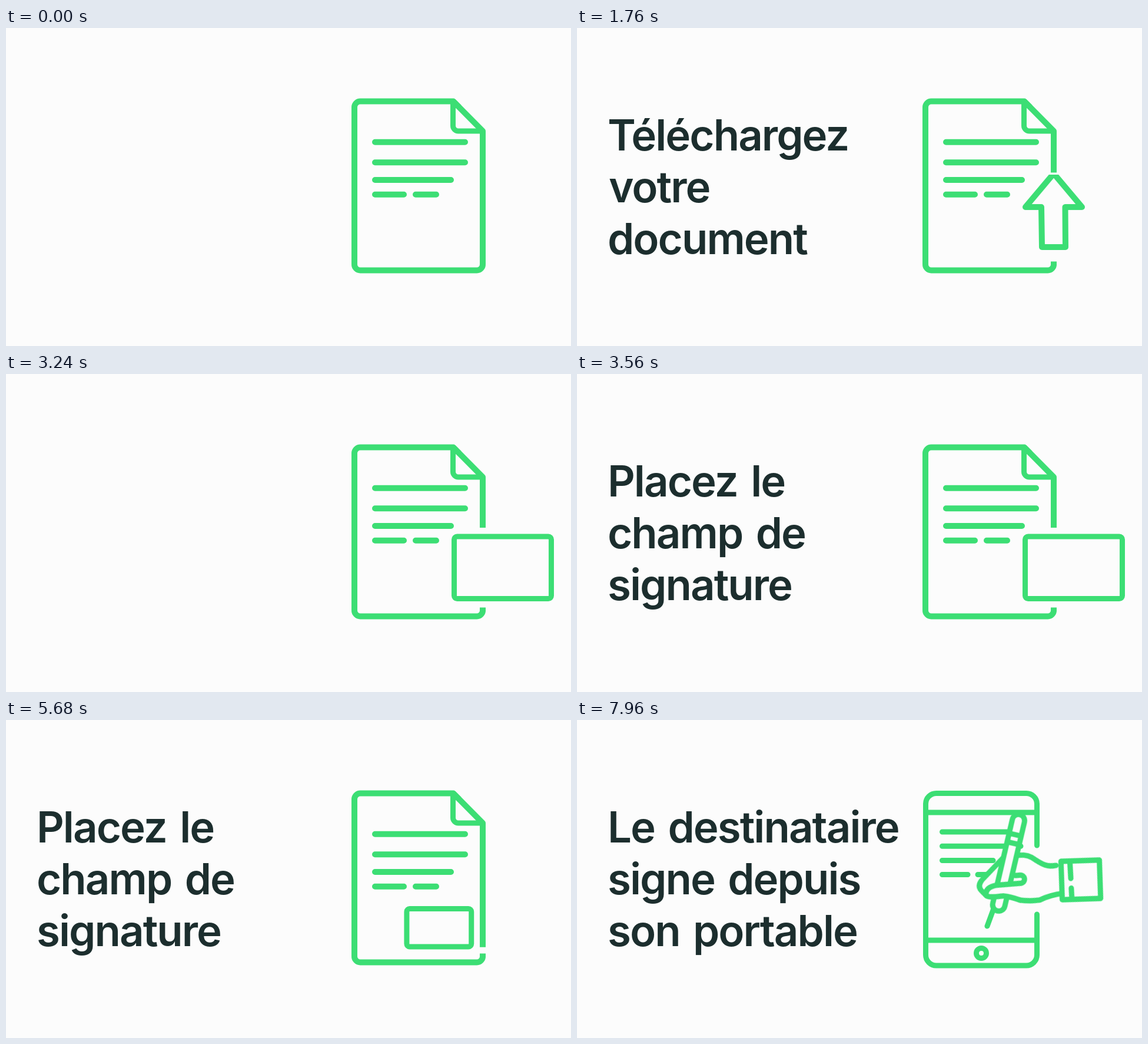
Recreate the animation shown at these times as an HTML page. Size 960x540 px, loop 8 s.

```html
<!DOCTYPE html>
<html lang="fr">
<head>
<meta charset="utf-8">
<title>Signer un document</title>
<style>
  html, body { margin: 0; width: 100%; height: 100%; overflow: hidden; background: #fcfcfc; }
  svg { display: block; width: 960px; height: 540px; }
  text { font: 600 72.5px Inter, sans-serif; letter-spacing: -1.9px; word-spacing: 6px; fill: #1c2e2e; }
  .line { fill: none; stroke: #3cde74; stroke-width: 10; stroke-linejoin: round; }
  .thin { stroke-width: 9; }
  .round { stroke-linecap: round; }
  .solid { fill: #fcfcfc; }
  #edge { stroke-dasharray: 400; }
  #ink { stroke-dasharray: 40; }
  #hand { transform-origin: 735px 270px; }
</style>
</head>
<body>
<svg viewBox="0 0 960 540">
  <clipPath id="window"><rect x="750" y="249" width="120" height="148"/></clipPath>

  <g id="title1">
    <text x="52" y="208">Téléchargez</text>
    <text x="54" y="296">votre</text>
    <text x="52" y="384">document</text>
  </g>
  <g id="title2">
    <text x="52" y="208">Placez le</text>
    <text x="52" y="296">champ de</text>
    <text x="52" y="384">signature</text>
  </g>
  <g id="title3">
    <text x="52" y="208">Le destinataire</text>
    <text x="52" y="296">signe depuis</text>
    <text x="52" y="384">son portable</text>
  </g>

  <g id="page" class="line">
    <path d="M810 396.500V401a10 10 0 0 1-10 10.500H602a10 10 0 0 1-10-10.500V134.500a10 10 0 0 1 10-10H760L770 134.600"/>
    <path id="edge" d="M760 124.500L810 175V397"/>
    <path class="thin" d="M759.500 125V166a9 9 0 0 0 9 9H809"/>
    <path class="round" d="M627 193.700H780M627 228.300H780M627 258H756M627 282.700H676M696 282.700H731"/>
    <g clip-path="url(#window)">
      <path id="arrow" d="M810 256L762 313H789L790 381H830L829.500 313H858Z"/>
    </g>
    <rect id="field" class="thin" rx="5"/>
  </g>

  <g id="phone" class="line thin round">
    <path d="M781.500 213V142a18 18 0 0 0-18-17.500H610.500a18 18 0 0 0-18 17.500V399a18 18 0 0 0 18 18H763.500a18 18 0 0 0 18-18V330"/>
    <path d="M593 157H781M593 374H781"/>
    <circle cx="687" cy="396" r="8.500"/>
    <path d="M620.500 190H754M620.500 214.300H754M620.500 238.500H707M724 238.500H740M620.500 262.500H664M681 262.500H712"/>
    <path id="ink" d="M697 350L709.500 316"/>
    <g id="hand">
      <path class="solid" d="M812 295C797 294 790 287 781 277Q771 264 757 262L732 257L684 286Q673 294 679 304Q681 308 685 314Q686 318 712 321.500Q724 326 738 336Q752 342 770 344.500Q787 341 812 344"/>
      <g transform="translate(735.500 269.500) rotate(28.300)">
        <rect class="solid" x="-10.500" y="-84" width="21" height="168" rx="10.500"/>
        <path d="M-10 -49H10M-10 -34H10"/>
      </g>
      <path class="solid" d="M741 293.500L749 295A6.500 6.500 0 0 1 746 308.500L706 301Q686 299 684 313Q686 318 712 321.500Q724 326 738 336"/>
      <path class="solid" d="M822 290.500L885.500 305.500L870.500 369L807 354Z"/>
      <path d="M836 297L830.500 323M827 339L824 353"/>
    </g>
  </g>
</svg>
<script>
  const LOOP = 8000;

  // steps: [time, properties, easing towards the next step]
  function play(id, steps) {
    const all = [[0, steps[0][1]], ...steps, [LOOP, steps.at(-1)[1]]];
    document.getElementById(id).animate(
      all.map(([time, props, easing = 'linear']) => ({ ...props, offset: time / LOOP, easing })),
      { duration: LOOP, iterations: Infinity });
  }

  const opacity = value => ({ opacity: value });
  const edgeEnd = y => ({ strokeDashoffset: 504 - y });
  const shiftY = y => ({ transform: `translateY(${y}px)` });
  const box = (x, y, width, height) =>
    ({ x: x + 'px', y: y + 'px', width: width + 'px', height: height + 'px' });
  const pose = (x, y, angle) => ({ transform: `translate(${x}px, ${y}px) rotate(${angle}deg)` });

  function title(id, start, end) {
    const steps = [[start - 40, opacity(0)], [start + 160, opacity(1)]];
    if (end) steps.push([end, opacity(1)], [end, opacity(0)]);
    play(id, steps);
  }
  function cut(id, time, before, after) {
    play(id, [[time, opacity(before)], [time, opacity(after)]]);
  }

  title('title1', 160, 3240);
  title('title2', 3400, 6480);
  title('title3', 6640);

  cut('page', 6480, 1, 0);
  cut('phone', 6480, 0, 1);
  cut('arrow', 3240, 1, 0);
  cut('field', 3240, 0, 1);
  cut('ink', 7600, 0, 1);

  play('edge', [
    [720, edgeEnd(397), 'ease-in'],
    [1080, edgeEnd(350), 'ease-out'],
    [1560, edgeEnd(247)],
    [2360, edgeEnd(241)],
    [2840, edgeEnd(237)],
    [3240, edgeEnd(237)],
    [3240, edgeEnd(261)],
    [4480, edgeEnd(261), 'cubic-bezier(.42, 0, .5, 1)'],
    [6040, edgeEnd(397)]
  ]);
  play('arrow', [
    [1080, shiftY(150), 'ease'],
    [2360, shiftY(-41), 'ease-in-out'],
    [2840, shiftY(0)]
  ]);
  play('field', [
    [4480, box(761.5, 276, 165, 105.5), 'cubic-bezier(.25, .1, .1, 1)'],
    [6040, box(679, 321.5, 108.5, 63.5)]
  ]);
  play('hand', [
    [7520, pose(0, 0, 0), 'ease-in-out'],
    [7820, pose(0, -36, -13), 'ease-in-out'],
    [7960, pose(-2, -27, -15.2)]
  ]);
  play('ink', [
    [7600, { strokeDashoffset: 40 }],
    [7800, { strokeDashoffset: 0 }]
  ]);
</script>
</body>
</html>
```
